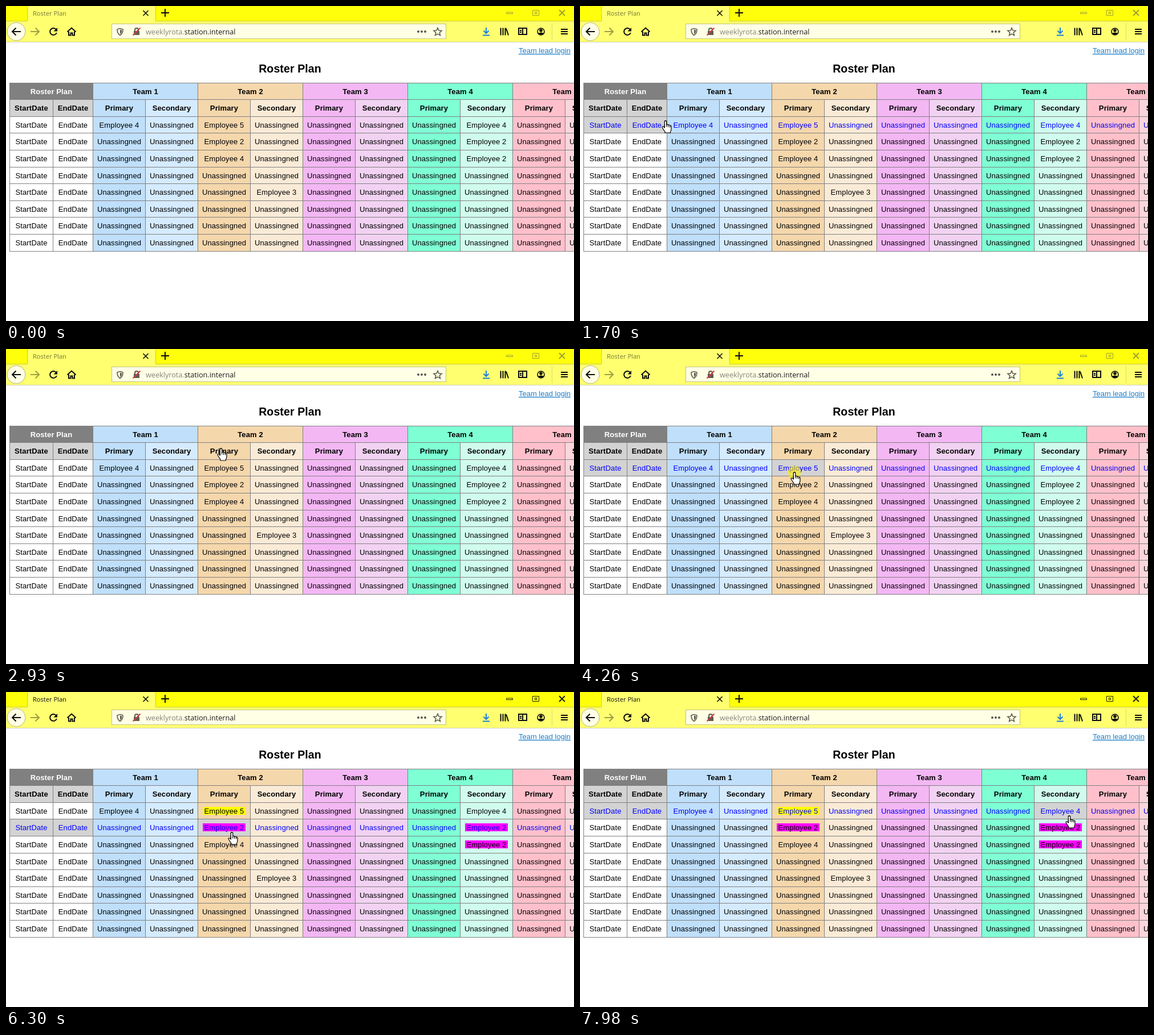
An HTML page that plays this animation: 996x554 px, repeating every 8000 ms.

```html
<!DOCTYPE html>
<html lang="en">
<head>
<meta charset="utf-8">
<title>Roster Plan</title>
<style>
  html, body { margin: 0; width: 100%; height: 100%; overflow: hidden; background: #fff; }
  svg { display: block; width: 100%; height: 100%; }
  text { font: 13px "Liberation Sans", Arial, sans-serif; }
  .mid { text-anchor: middle; letter-spacing: .12px; }
  .bold { font-weight: bold; }
  .ui { font-family: "Open Sans", "Noto Sans", sans-serif; }
  .icon { fill: none; stroke: #0c0c0d; stroke-width: 2; }
  .thin { stroke-width: 1.6; }
  .soft { stroke: #5c5c50; }
  rect { shape-rendering: crispEdges; }
</style>
</head>
<body>
<svg viewBox="0 0 996 554">
  <!-- browser window -->
  <rect width="996" height="27" fill="#ffff0c"/>
  <path d="M38 0h224v27h734v36H0V27h38z" fill="#ffff70"/>
  <path d="M37.500 0v26.500H0M262.500 0v26.500H996" fill="none" stroke="#cccc3e"/>
  <rect y="63" width="996" height="1" fill="#d0d0c0"/>
  <text class="ui" id="tab" x="47" y="17" style="font-size:11.1px">Roster Plan</text>
  <path class="icon thin" d="M240.500 8l9 9m0-9l-9 9"/>
  <path class="icon" d="M272 12h14m-7-7v14"/>
  <g id="buttons" fill="none">
    <path d="M877.500 11h11v2.500h-11zM923.500 7.500h11v9h-11zM927.500 10.500h3v3h-3z"/>
    <path d="M970 7l10 10m0-10l-10 10" stroke-width="2"/>
  </g>

  <!-- toolbar -->
  <circle cx="18" cy="45" r="16" fill="#ffffe6" stroke="#b5b57a"/>
  <path id="arrow" class="icon" d="M26 45H11m6.500-6.500L11 45l6.500 6.500"/>
  <use href="#arrow" transform="translate(69 0) scale(-1 1)" opacity=".4"/>
  <path class="icon" d="M88 41.500A6 6 0 1 0 88.800 47"/>
  <path d="M90 38v6.500h-6.500z" fill="#0c0c0d"/>
  <path class="icon" d="M107.500 45.500l7.500-7 7.500 7M110 45v6.500h3.500v-4h3v4h3.500V45"/>
  <rect x="185.500" y="31.500" width="586" height="26" fill="#ffffe6" stroke="#c4c47c"/>
  <path class="icon soft thin" d="M200 39.500l5 1.500c0 5-1 8-5 10.500c-4-2.500-5-5.500-5-10.500z"/>
  <path d="M200 41.500l3.200 1c0 3-.7 5-3.200 7z" fill="#5c5c50"/>
  <path class="icon soft" d="M226 44v-2a3 3 0 0 1 6 0v2"/>
  <rect x="224" y="44" width="10" height="7" fill="#5c5c50"/>
  <path class="icon" d="M222.500 51.500l13-13" style="stroke:#d83a3a"/>
  <text class="ui" x="245" y="50" style="font-size:12.67px" fill="#84847c">weeklyrota.<tspan fill="#18181a">station.internal</tspan></text>
  <path d="M723 45h13" fill="none" stroke="#56564e" stroke-width="4" stroke-linecap="round" stroke-dasharray="0 6"/>
  <path class="icon soft thin" d="M757 38.500l2 4.600 5 .4-3.800 3.300 1.200 4.900-4.400-2.600-4.400 2.600 1.200-4.900-3.800-3.300 5-.4z"/>
  <path class="icon" d="M842 38v10m-4.500-4.500l4.500 4.500 4.500-4.500M836 51.500h12" style="stroke:#1c7fe0"/>
  <path class="icon" d="M867.500 38.500v13m4-13v13m4-13v13m1.500-12l4 12"/>
  <path class="icon" d="M899 39h14v11h-14zM906 39v11M901 43h3m-3 3h3"/>
  <circle class="icon thin" cx="938" cy="45" r="6"/>
  <circle cx="938" cy="43" r="2.800" fill="#0c0c0d"/>
  <path d="M933 48q5-3 10 0q-5 5-10 0z" fill="#0c0c0d"/>
  <rect x="957" y="30" width="1" height="30" fill="#dede68"/>
  <path class="icon" d="M973 41h12m-12 4h12m-12 4h12"/>

  <!-- page -->
  <text x="990" y="83" text-anchor="end" fill="#1c80cc" text-decoration="underline">Team lead login</text>
  <text class="mid bold" x="498" y="117" style="font-size:19.5px">Roster Plan</text>
  <g id="table"></g>
  <circle id="flash" r="11.500" fill="#ffee00" opacity=".6"/>
  <g id="hand" stroke="#000" stroke-width="1.200" stroke-linejoin="round">
    <path fill="#fff" d="M-1.700 .5Q0-1 1.700 .5V6.500Q3.500 5.500 4.700 7.300Q6.500 6.300 7.700 8.200Q10 7.500 10 10V14Q10 17 8.500 19V21H-1V19Q-3 16.500-4.800 13.500L-6 11Q-5.500 9-3.500 10.200L-1.700 12Z"/>
    <path fill="none" d="M-1.700 12V6M1.700 6.500v4m3-3v3.500m3-2.500v3"/>
  </g>
</svg>
<script>
const LOOP = 8000, LAG = 30, ROWS = 8, COLS = 12;
const TOP = 134.6, PITCH = 29.6;
const GREY = '#d3d3d3', LINE = '#808080';
const shades = ['#fff', '#fff', '#bfdffb', '#d5ebff', '#f5d7ac', '#faebd7',
  '#f3b7f4', '#f2d2f2', '#7fffd4', '#d0fcee', '#ffc0cb', '#fad6dc'];
const dates = ['StartDate', 'EndDate'], roles = ['Primary', 'Secondary'];
// row,column -> employee number
const staff = { '0,2': 4, '0,4': 5, '0,9': 4, '1,4': 2, '1,9': 2, '2,4': 4, '2,9': 2, '4,5': 3 };

// pointer moves: start, end, x, y, vertical sway on the way
const entry = { time: 510, x: 236, y: 545 };
const moves = [
  [510, 1150, 210, 299, 0],
  [1150, 1370, 149, 209, 0],
  [1670, 2170, 239, 203, -38],
  [2170, 2200, 338, 197, 0],
  [2200, 2450, 412, 232, 0],
  [2480, 3190, 362, 234, -64],
  [3290, 3410, 360, 221, 0],
  [3610, 3700, 376, 217, 0],
  [4940, 5250, 388, 241, 0],
  [6270, 6300, 396, 247, 0],
  [6300, 6670, 838, 272, 0],
  [7100, 7310, 787, 280, 0],
  [7310, 7890, 860, 236, 25],
  [7890, 7980, 858, 218, 0]
];

const $ = id => document.getElementById(id);
const colX = c => c < 2 ? 6 + 76 * c : 152 + 92 * (c - 2);
const midX = (a, b) => (colX(a) + colX(b) + 1) / 2;
const lineY = r => Math.round(TOP + PITCH * r);
const baseY = r => Math.round(TOP + PITCH * r + 20);

function add(tag, attrs, text) {
  const el = document.createElementNS('http://www.w3.org/2000/svg', tag);
  for (const k in attrs) el.setAttribute(k, attrs[k]);
  if (text) el.textContent = text;
  return $('table').appendChild(el);
}
const box = (x, y, width, height, fill) => add('rect', { x, y, width, height, fill });
const cellBox = (a, b, r, fill) =>
  box(colX(a), lineY(r), colX(b) - colX(a), lineY(r + 1) - lineY(r), fill);
const label = (a, b, r, text, bold, fill = '#000') =>
  add('text', { x: midX(a, b), y: baseY(r), fill, class: bold ? 'mid bold' : 'mid' }, text);

// two heading rows
for (let c = 0; c < COLS; c++) {
  if (c % 2 === 0) {
    cellBox(c, c + 2, 0, c ? shades[c] : LINE);
    label(c, c + 2, 0, c ? 'Team ' + c / 2 : 'Roster Plan', true, c ? '#000' : '#fff');
  }
  cellBox(c, c + 1, 1, c < 2 ? GREY : shades[c]);
  label(c, c + 1, 1, dates[c] || roles[c % 2], true);
}

// body cells
const cells = [];
for (let r = 0; r < ROWS; r++) {
  for (let c = 0; c < COLS; c++) {
    const who = staff[r + ',' + c];
    const bg = cellBox(c, c + 1, r + 2, shades[c]);
    const mark = who && box(midX(c, c + 1) - 37.5, baseY(r + 2) - 12, 75, 14, 'none');
    const text = label(c, c + 1, r + 2, dates[c] || (who ? 'Employee ' + who : 'Unassingned'));
    cells.push({ r, c, who, bg, mark, text });
  }
}

// grid lines
for (let r = 0; r <= ROWS + 2; r++) box(6, lineY(r), 990, 1, LINE);
for (let c = 0; c < COLS; c++) {
  const y = lineY(c % 2);
  box(colX(c), y, 1, lineY(ROWS + 2) - y + 1, LINE);
}

function pointer(t) {
  if (t < entry.time) return null;
  let { x, y } = entry;
  for (const [from, to, nx, ny, sway] of moves) {
    if (t < from) break;
    const k = Math.min(1, (t - from) / (to - from));
    const e = k * k * (3 - 2 * k);
    x += (nx - x) * e;
    y += (ny - y) * e + sway * Math.sin(Math.PI * k);
  }
  return { x: Math.round(x), y: Math.round(y) };
}

function draw(t) {
  const tip = pointer(t), over = pointer(t - LAG);
  const row = over ? Math.floor((over.y - TOP) / PITCH) - 2 : -1;
  const inCol = c => over && over.x >= colX(c) && over.x < colX(c + 1);
  const active = t >= 4330;
  const marks = { 5: active && '#ff0', 2: t >= 5580 && '#f0f' };

  for (const { r, c, who, bg, mark, text } of cells) {
    const hot = r === row;
    bg.setAttribute('fill', hot && (c < 2 || inCol(c)) ? GREY : shades[c]);
    text.setAttribute('fill', hot ? '#00f' : '#000');
    if (mark) mark.setAttribute('fill', marks[who] || 'none');
  }
  $('tab').setAttribute('fill', active ? '#101010' : '#77773a');
  $('buttons').setAttribute('stroke', active ? '#20200c' : '#a0a030');

  const flash = (t >= 4260 && t < 4410) || (t >= 5550 && t < 5640);
  $('flash').style.display = flash ? '' : 'none';
  $('hand').style.display = tip ? '' : 'none';
  if (tip) {
    for (const id of ['hand', 'flash']) $(id).setAttribute('transform', `translate(${tip.x} ${tip.y})`);
  }
}

const start = performance.now();
function tick() {
  draw((performance.now() - start) % LOOP);
  requestAnimationFrame(tick);
}
draw(0);
requestAnimationFrame(tick);
</script>
</body>
</html>
```
